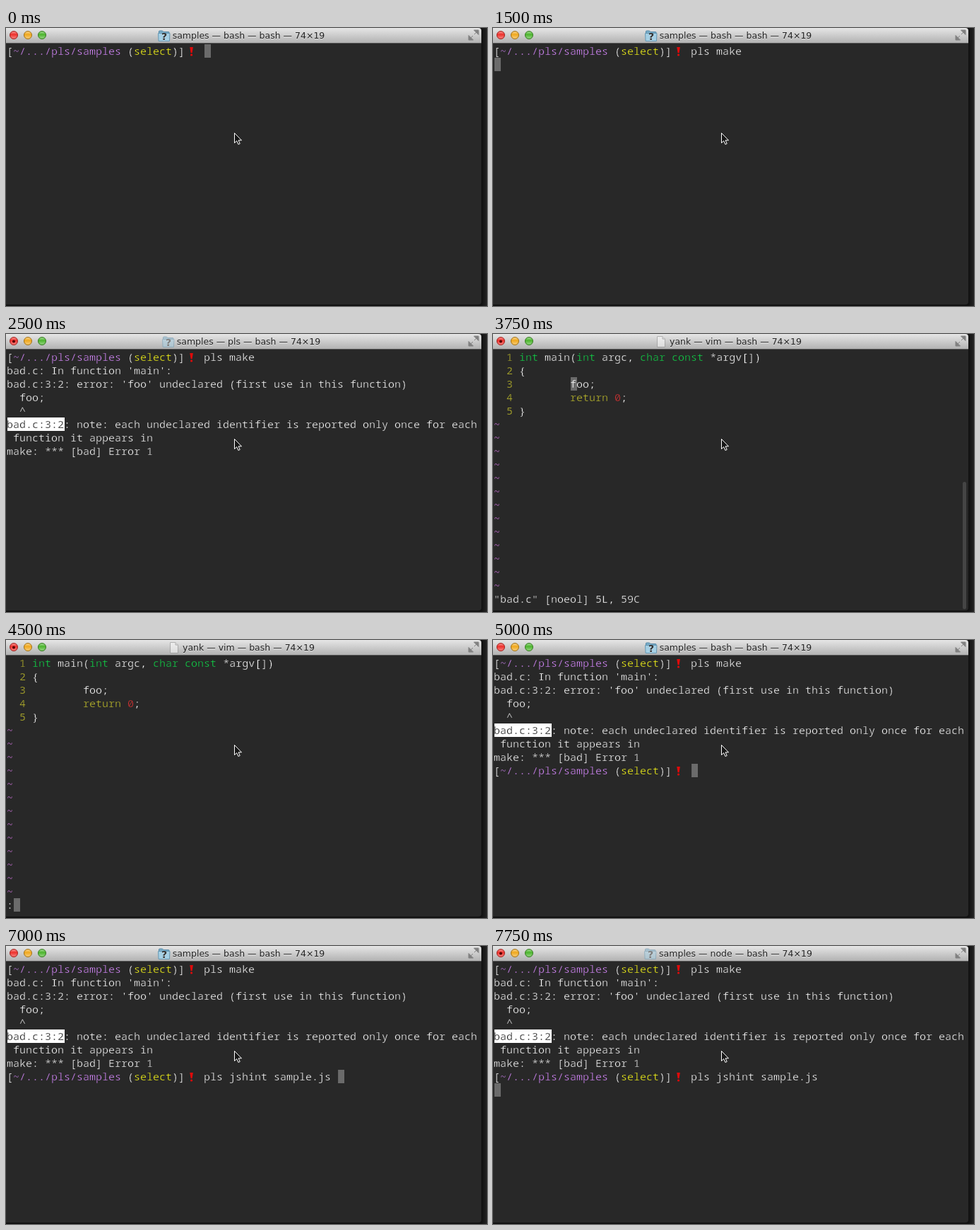
Animation, 681 px wide and 393 px high, one loop 8 s. Source, as an HTML page:

```html
<!DOCTYPE html>
<html lang="en">
<head>
<meta charset="utf-8">
<title>Terminal session</title>
<style>
html, body { margin: 0; width: 100%; height: 100%; overflow: hidden; background: #1b1b1b; }
#stage { position: relative; width: 681px; height: 393px; overflow: hidden;
  background: linear-gradient(90deg, #101010 673px, #242424 681px); }
#window { position: absolute; width: 673px; height: 391px; background: #282828;
  border-radius: 0 4px 4px 0; overflow: hidden; }
#bar { position: absolute; width: 100%; height: 21px; border-bottom: 1px solid #555;
  background: linear-gradient(#e6e6e6, #b2b2b2); }
#title { position: absolute; top: 1px; width: 667px; height: 20px; display: flex; gap: 4px;
  justify-content: center; white-space: pre; color: #222; text-shadow: 0 1px #ffffff80;
  font: 12.5px/20px "DejaVu Sans", sans-serif; }
#title svg { margin-top: 1px; }
.busy #title svg { opacity: .5; }
svg { flex: none; overflow: visible; }
#chrome, #mouse { position: absolute; left: 0; top: 0; }
#dot { visibility: hidden; }
.busy #dot { visibility: visible; }
/* A stroke in the background colour thins the glyphs */
pre { --back: #282828; position: absolute; left: 1px; top: 23px; margin: 0; color: #fff;
  font: 15px/19px "Noto Sans Mono", "DejaVu Sans Mono", monospace; font-variant-ligatures: none;
  -webkit-text-stroke: .35px var(--back); }
.cur, .sel, .bang { display: inline-block; height: 19px; vertical-align: top; }
/* Cells sit one pixel right of their glyphs */
.cur, .sel { background: var(--back); box-shadow: 1px 0 var(--back); clip-path: inset(0 -1px 0 1px);
  -webkit-text-stroke-color: var(--back); }
.cur { --back: #6b6b6b; min-width: 9px; }
.sel { --back: #fff; color: #111; }
.bang { width: 18px; background: #e00a0a;
  clip-path: path("M7.2 4h4.6L10.5 12.3h-2zM7.9 15a1.6 1.6 0 1 0 3.2 0a1.6 1.6 0 1 0-3.2 0z"); }
.path { color: #d98aff; }
.branch { color: #fbfb18; }
.num, .key { color: #c4c12c; }
.type { color: #10d648; }
.lit { color: #dc3434; }
.tilde { color: #ee82ff; }
#scroll { position: absolute; left: 665px; top: 209px; width: 5px; height: 180px;
  border-radius: 3px; background: #454545; }
</style>
</head>
<body>
<div id="stage">
  <div id="window">
    <div id="bar">
      <div id="title"></div>
      <svg id="chrome" width="673" height="21">
        <defs>
          <linearGradient id="gloss" x2="0" y2="1">
            <stop offset="0" stop-color="#fff" stop-opacity=".5"/>
            <stop offset=".4" stop-color="#fff" stop-opacity="0"/>
            <stop offset="1" stop-color="#fff" stop-opacity=".4"/>
          </linearGradient>
        </defs>
        <g id="lights"></g>
        <circle id="dot" cx="11" cy="10.5" r="2" fill="#500"/>
        <path d="M662.5 3h6.5v6.5zM655 10.5v6.5h6.5zM667 5l-4 4M657 15l4-4" fill="#808080" stroke="#808080"/>
      </svg>
    </div>
    <pre id="text"></pre>
    <div id="scroll"></div>
  </div>
  <svg id="mouse" width="681" height="393">
    <path d="M323.5 148.5v14l3.2-3 2.2 5 2.3-1-2.1-4.7h4.4z" fill="#161616" stroke="#fff"/>
  </svg>
</div>
<script>
const $ = id => document.getElementById(id);
const span = (cls, s = '') => `<span class="${cls}">${s}</span>`;
const cursor = span('cur', ' ');

$('lights').innerHTML = [['#ee2f2a', '#a02a26'], ['#f0a81c', '#a0741f'], ['#4bb52c', '#3c7d28']]
  .map(([fill, edge], i) => `<circle cx="${11 + 20 * i}" cy="10" r="5.5" fill="${fill}" stroke="${edge}"/>
    <circle cx="${11 + 20 * i}" cy="10" r="4.8" fill="url(#gloss)"/>`).join('');

const folder = `<svg width="16" height="18">
  <path d="M.5 3q0-1 1-1h4l1.5 1.5h7q1 0 1 1v11h-14.5z" fill="#79adc9" stroke="#5387a5"/>
  <path d="M-.5 5.5h16.5l-.6 11h-15.3z" fill="#a5d0e5" stroke="#6798b3"/>
  <text x="8" y="14.5" text-anchor="middle" font-family="DejaVu Sans, sans-serif" font-weight="bold" font-size="14" fill="#333">?</text></svg>`;
const page = `<svg width="16" height="18">
  <path d="M2.5 1.5h7.5l3.5 3.5v11.5h-11z" fill="#fff" stroke="#888"/>
  <path d="M10 1.5v3.5h3.5" fill="#ddd" stroke="#888"/></svg>`;

const prompt = `[${span('path', '~/.../pls/samples')} (${span('branch', 'select')})]${span('bang')} `;
const place = 'bad.c:3:2';
const build = 'pls make', lint = 'pls jshint sample.js ';

// Compiler output with one of its two locations highlighted
const output = pick => {
  const loc = i => i === pick ? span('sel', place) : place;
  return [prompt + build, "bad.c: In function 'main':",
    loc(0) + ": error: 'foo' undeclared (first use in this function)", '  foo;', '  ^',
    loc(1) + ': note: each undeclared identifier is reported only once for each',
    ' function it appears in', 'make: *** [bad] Error 1', ''].join('\n');
};

const type = s => span('type', s);
const editor = (f, status) => [
  `${type('int')} main(${type('int')} argc, ${type('char')} ${type('const')} *argv[])`,
  '{', `        ${f}oo;`, `        ${span('key', 'return')} ${span('lit', '0')};`, '}'
].map((s, i) => span('num', `  ${i + 1} `) + s)
  .concat(Array(13).fill(span('tilde', '~')), status).join('\n');

const shell = (time, text) => ({ time, name: 'samples — bash', text });
const run = (time, app, text) => ({ time, name: 'samples — ' + app, text, busy: true });
const vim = (time, f, status, scroll) =>
  ({ time, name: 'yank — vim', text: editor(f, status), busy: true, icon: page, scroll });
const typing = (before, command, steps) =>
  steps.map(([time, n]) => shell(time, before + prompt + command.slice(0, n) + cursor));

const done = output(1);
const linting = `${done}${prompt}${lint}\n${cursor}`;
const status = '"bad.c" [noeol] 5L, 59C';
const scenes = [
  ...typing('', build, [[0, 0], [750, 2], [1000, 3], [1250, 5]]),
  shell(1500, `${prompt}${build}\n${cursor}`),
  run(1750, 'pls', output(0)),
  run(2500, 'pls', done),
  vim(3750, span('cur', 'f'), status, true),
  vim(4000, span('cur', 'f'), status),
  vim(4500, 'f', ':' + cursor),
  vim(4750, 'f', ':q' + cursor, true),
  ...typing(done, lint, [[5000, 0], [5250, 4], [5500, 6], [5750, 7], [6000, 10],
    [6250, 11], [6750, 14], [7000, 21]]),
  shell(7500, linting),
  run(7750, 'node', linting)
];

let shown;
function draw(now) {
  const t = now % 8000;
  const scene = scenes.findLast(s => s.time <= t);
  if (scene !== shown) {
    shown = scene;
    $('title').innerHTML = `${scene.icon || folder}<span>${scene.name} — bash — 74×19</span>`;
    $('text').innerHTML = scene.text;
    $('window').className = scene.busy ? 'busy' : '';
    $('scroll').hidden = !scene.scroll;
  }
  requestAnimationFrame(draw);
}
draw(performance.now());
</script>
</body>
</html>
```
